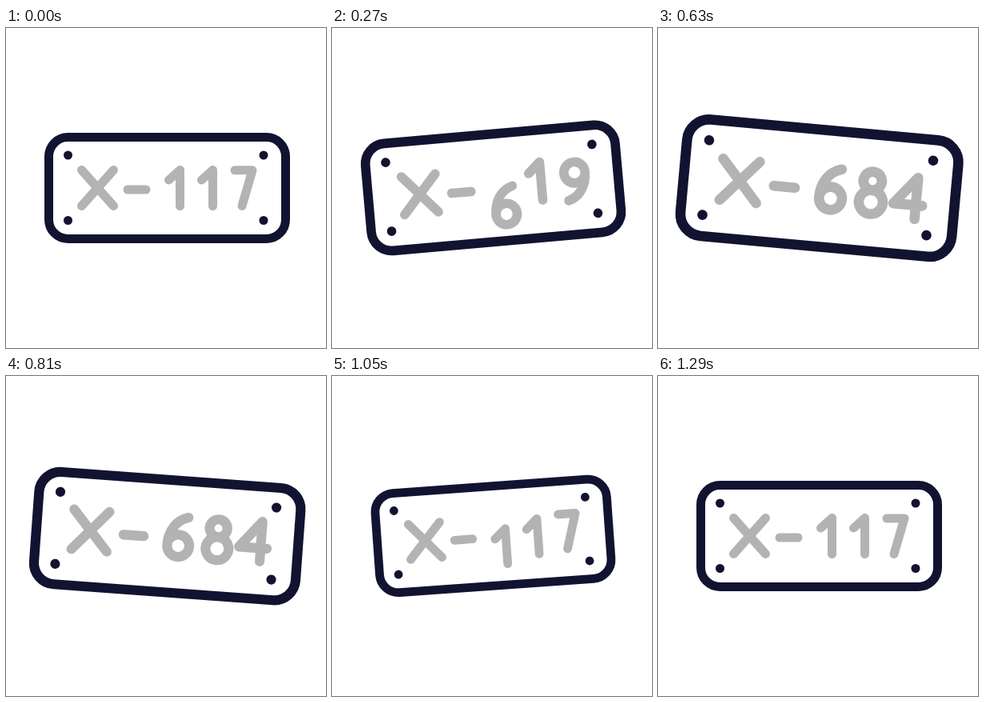
These frames come from a looping animation (400 px wide and 400 px high, 1320 ms). An HTML page with a canvas:

```html
<!DOCTYPE html>
<html lang="en">
<head>
<meta charset="utf-8">
<title>Plate number</title>
<style>
  html, body { margin: 0; width: 100%; height: 100%; overflow: hidden; background: #fff; }
  canvas { display: block; }
</style>
</head>
<body>
<canvas id="stage" width="400" height="400"></canvas>
<script>
const ctx = document.getElementById('stage').getContext('2d');
const STEP = 30, STEPS = 44;
const INK = '#121331', GRAY = '#b3b3b3';

// Pairs of [step, value], joined by sine easing.
const TILT = [[0, 0], [8.4, -5.15], [17, 5.1], [21, 5.2], [24.4, 5.1], [37.7, -5.1], [43, 0]];
const SCALE = [[2.8, 1], [17.2, 1.15], [24.4, 1.15], [32.2, 0.98], [35, 0.98], [43, 1]];

const GLYPHS = {
  1: new Path2D('M-14 -10 L0 -22.5 V22.5'),
  4: new Path2D('M9 22.5 V-22.5 L-15.5 7.5 H16'),
  6: new Path2D('M6.5 -22.5 C-7 -19 -15.5 -6 -15.5 10 a12.5 12.5 0 1 0 25 0 a12.5 12.5 0 1 0 -25 0'),
  7: new Path2D('M-12.5 -22 H9.5 L-3.5 22.5'),
  8: new Path2D('M0 -3 a10 10 0 1 1 .01 0 a13 13 0 1 1 -.01 0'),
  9: new Path2D('M-9.5 22.5 C4 19 12.5 6 12.5 -10 a12.5 12.5 0 1 0 -25 0 a12.5 12.5 0 1 0 25 0')
};
const PREFIX = new Path2D('M-105.5 -22.5 L-65.5 22.5 M-65.5 -22.5 L-105.5 22.5 M-48 2 H-25');

// Each slot swaps to the next digit at the listed steps.
const SLOTS = [
  { x: 17.5, digits: [1, 6, 1], swaps: [8.8, 33.85] },
  { x: 58.5, digits: [1, 8, 1], swaps: [12.2, 32.2] },
  { x: 98.5, digits: [7, 9, 4, 7], swaps: [4.6, 17.3, 30.75] }
];
const TRAVEL = 24, SWAP_TIME = 5;

function valueAt(keys, s) {
  if (s <= keys[0][0]) return keys[0][1];
  for (let i = 1; i < keys.length; i++) {
    const [s0, a] = keys[i - 1], [s1, b] = keys[i];
    if (s <= s1) return a + (b - a) * (1 - Math.cos(Math.PI * (s - s0) / (s1 - s0))) / 2;
  }
  return keys[keys.length - 1][1];
}

// Old digit accelerates upward, the new one rises from below and settles.
function rollOffset(swaps, s) {
  let y = 0;
  for (const swap of swaps) {
    const d = (s - swap) / SWAP_TIME;
    if (Math.abs(d) < 1) y += d < 0 ? -TRAVEL * (1 + d) ** 2 : TRAVEL * (1 - d) ** 2;
  }
  return y;
}

function drawPlate() {
  ctx.strokeStyle = ctx.fillStyle = INK;
  ctx.beginPath();
  ctx.roundRect(-146.5, -63.5, 296, 127, 24);
  ctx.stroke();
  for (const x of [-122.5, 122]) {
    for (const y of [-41, 40.5]) {
      ctx.beginPath();
      ctx.arc(x, y, 5.5, 0, 2 * Math.PI);
      ctx.fill();
    }
  }
}

function drawNumber(s) {
  ctx.strokeStyle = GRAY;
  ctx.stroke(PREFIX);
  for (const { x, digits, swaps } of SLOTS) {
    const index = swaps.filter(swap => s >= swap).length;
    ctx.save();
    ctx.translate(x, rollOffset(swaps, s));
    ctx.stroke(GLYPHS[digits[index]]);
    ctx.restore();
  }
}

function draw(s) {
  ctx.fillStyle = '#fff';
  ctx.fillRect(0, 0, 400, 400);
  ctx.save();
  ctx.translate(200, 200);
  ctx.rotate(valueAt(TILT, s) * Math.PI / 180);
  const scale = valueAt(SCALE, s);
  ctx.scale(scale, scale);
  ctx.lineWidth = 11;
  ctx.lineCap = ctx.lineJoin = 'round';
  drawPlate();
  drawNumber(s);
  ctx.restore();
}

const start = performance.now();
function tick() {
  draw(Math.floor((performance.now() - start) / STEP) % STEPS);
  requestAnimationFrame(tick);
}
tick();
</script>
</body>
</html>
```
